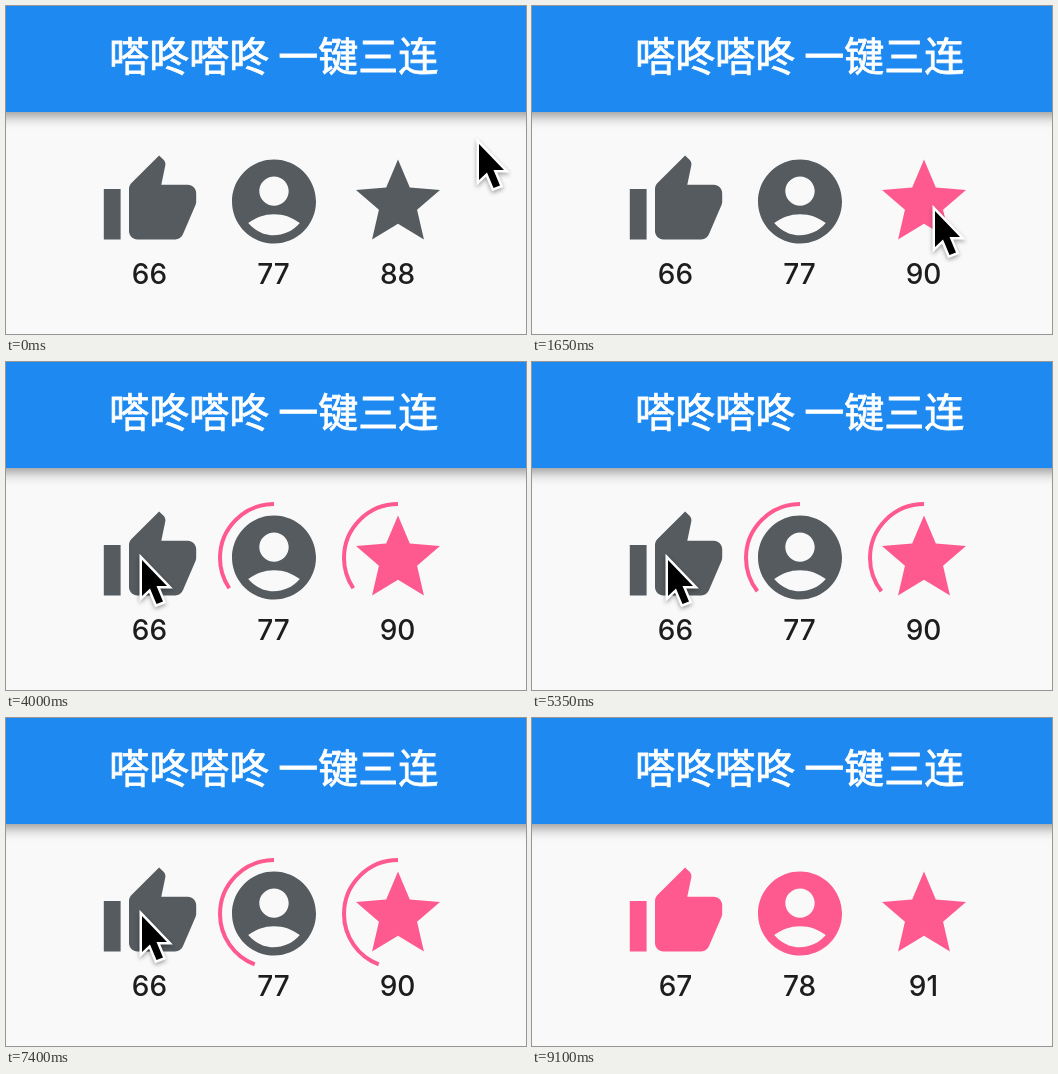
These frames come from a looping animation (520 px wide and 328 px high, 9.65 s). An HTML page:

```html
<!DOCTYPE html>
<html lang="zh-CN">
<head>
<meta charset="utf-8">
<style>
  html, body { margin: 0; width: 100%; height: 100%; overflow: hidden; background: #f9f9f9; }
  .stage { position: relative; width: 520px; height: 328px; overflow: hidden; }
  .bar { position: absolute; top: 0; left: -20px; width: 560px; height: 106px; background: #1d89f1; box-shadow: 0 4px 12px rgba(0, 0, 0, .42); }
  svg { position: absolute; top: 0; left: 0; }
  text { text-anchor: middle; }
  .title { font: 500 40px "Noto Sans CJK SC", "Noto Sans CJK", sans-serif; fill: #fff; stroke: #fff; stroke-width: .8; }
  .count { font: 500 28px Inter, sans-serif; fill: #1d1d1d; }
  .ring { fill: none; stroke: #ff5a8f; stroke-width: 4; }
  .cursor { stroke: #fff; stroke-width: 5; paint-order: stroke; filter: drop-shadow(0 2px 2px rgba(0, 0, 0, .35)); }
</style>
</head>
<body>
<div class="stage">
  <div class="bar"></div>
  <svg id="scene" width="520" height="328" viewBox="0 0 520 328">
    <text class="title" x="267.7" y="65">嗒咚嗒咚 一键三连</text>
  </svg>
</div>
<script>
const LOOP = 9650, STEP = 50, DONE = 8250;
const GREY = '#555b5f', PINK = '#ff5a8f';
const scene = document.getElementById('scene');

function add(tag, attrs) {
  const el = document.createElementNS('http://www.w3.org/2000/svg', tag);
  for (const key in attrs) el.setAttribute(key, attrs[key]);
  return scene.appendChild(el);
}

// counts: [time, value]; an icon turns pink at its first increment
const items = [
  { x: 144, counts: [[0, 66], [DONE, 67]],
    d: 'M1 21h4V9H1v12zm22-11c0-1.1-.9-2-2-2h-6.31l.95-4.57.03-.32c0-.41-.17-.79-.44-1.06L14.17 1 7.59 7.59C7.22 7.95 7 8.45 7 9v10c0 1.1.9 2 2 2h9c.83 0 1.54-.5 1.84-1.22l3.02-7.05c.09-.23.14-.47.14-.73z' },
  { x: 268, counts: [[0, 77], [DONE, 78]], ring: true,
    d: 'M12 2C6.48 2 2 6.48 2 12s4.48 10 10 10 10-4.48 10-10S17.52 2 12 2zm0 4c1.93 0 3.5 1.57 3.5 3.5S13.93 13 12 13s-3.5-1.57-3.5-3.5S10.07 6 12 6zm0 14c-2.03 0-4.43-.82-6.14-2.88C7.55 15.8 9.68 15 12 15s4.45.8 6.14 2.12C16.43 19.18 14.03 20 12 20z' },
  { x: 392, counts: [[0, 88], [900, 89], [1400, 90], [DONE, 91]], ring: true,
    d: 'M12 17.27L18.18 21l-1.64-7.03L22 9.24l-7.19-.61L12 2 9.19 8.63 2 9.24l5.46 4.73L5.82 21z' }
];

for (const item of items) {
  item.icon = add('path', { d: item.d, 'fill-rule': 'evenodd',
    transform: `translate(${item.x - 50.4} 145.2) scale(4.2)` });
  item.label = add('text', { class: 'count', x: item.x - .5, y: 278 });
  if (item.ring) item.arc = add('path', { class: 'ring', pathLength: 360,
    d: `M${item.x} 142a54 54 0 0 0 0 108a54 54 0 0 0 0 -108` });
}
const cursor = add('path', { class: 'cursor', d: 'M3 7V43L11 35.5L17.5 51L24 48.5L17.5 33H28Z' });

// Hold to fill at 240°/s, release to unwind, then hold until complete
const sweep = [[3483, 0], [4683, 288], [5883, 0], [6737, 0], [8237, 360]];
const moves = [[50, 470, 131], [750, 400, 198], [2300, 400, 198], [3150, 140, 195], [3200, 133, 191]];
const HIDE = 9000;

const smooth = p => p * p * (3 - 2 * p);

function sample(table, t, col, ease = p => p) {
  if (t <= table[0][0]) return table[0][col];
  for (let i = 1; i < table.length; i++) {
    const a = table[i - 1], b = table[i];
    if (t <= b[0]) return a[col] + (b[col] - a[col]) * ease((t - a[0]) / (b[0] - a[0]));
  }
  return table[table.length - 1][col];
}

function draw(t) {
  const angle = t < DONE ? sample(sweep, t, 1) : 0;
  for (const { counts, icon, label, arc } of items) {
    const value = counts.filter(c => c[0] <= t).pop()[1];
    label.textContent = value;
    icon.setAttribute('fill', value > counts[0][1] ? PINK : GREY);
    if (arc) {
      arc.setAttribute('stroke-dasharray', `${angle} 400`);
      arc.setAttribute('visibility', angle > 0 ? 'visible' : 'hidden');
    }
  }
  const x = sample(moves, t, 1, smooth), y = sample(moves, t, 2, smooth);
  cursor.setAttribute('transform', `translate(${x} ${y})`);
  cursor.setAttribute('visibility', t < HIDE ? 'visible' : 'hidden');
}

const start = performance.now();
function tick() {
  const t = (performance.now() - start) % LOOP;
  draw(Math.floor(t / STEP) * STEP);
  requestAnimationFrame(tick);
}
tick();
</script>
</body>
</html>
```
